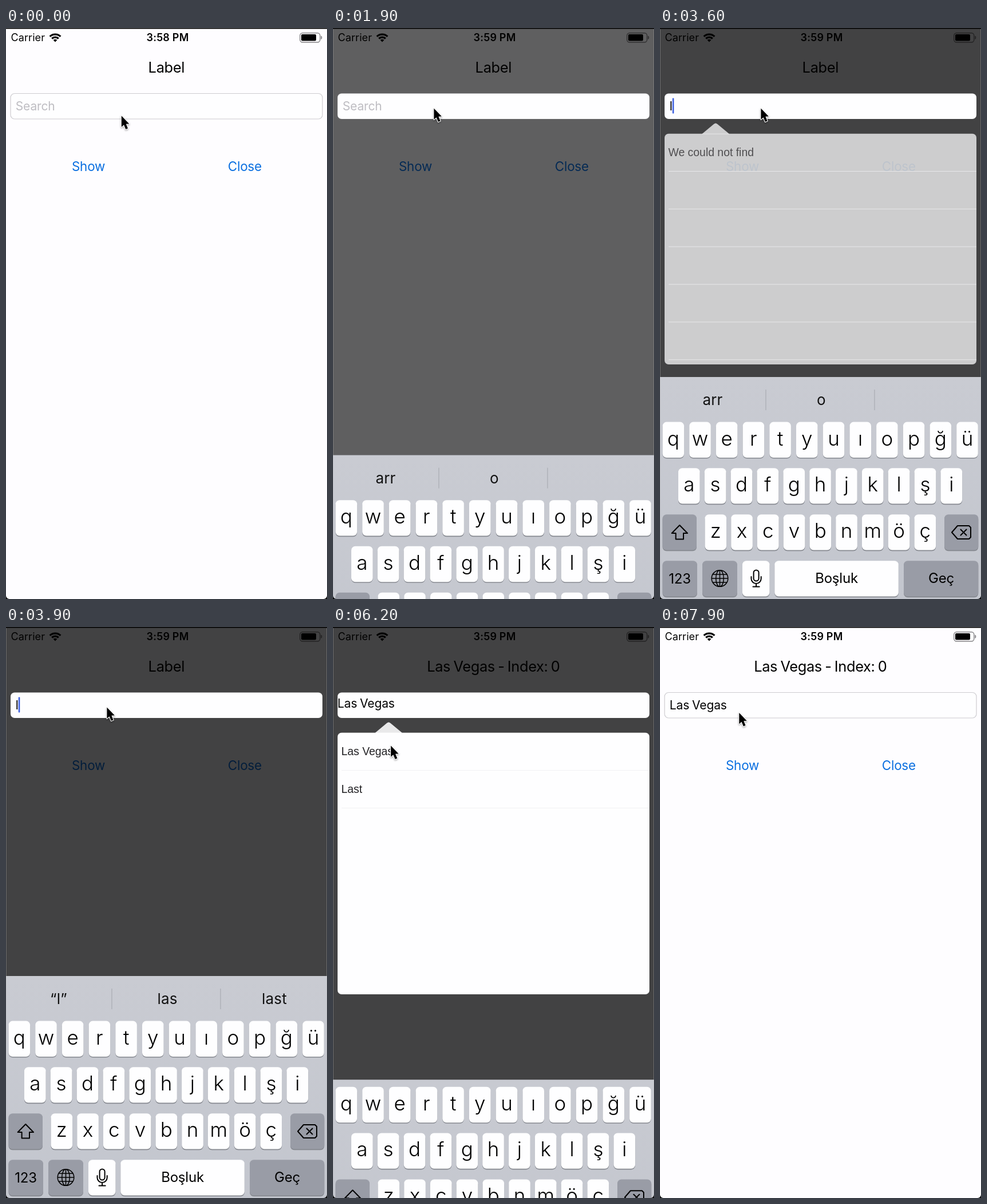
Recreate the animation shown at these times as an HTML page with a canvas. Size 561 by 998 pixels, loop 8 s.

```html
<!DOCTYPE html>
<html lang="en">
<head>
<meta charset="utf-8">
<title>Search field</title>
<style>
  html, body { margin: 0; width: 100%; height: 100%; overflow: hidden; background: #fefdff; }
  canvas { display: block; }
</style>
</head>
<body>
<canvas id="stage" width="561" height="998"></canvas>
<script>
const W = 561, H = 998, LOOP = 8000, STEP = 100;
const ctx = document.getElementById('stage').getContext('2d');
const UI = 'Inter, Roboto, sans-serif';
const LIST = '"Liberation Sans", Arial, sans-serif';
const PAPER = '#fefdff';

const lerp = (a, b, p) => a + (b - a) * p;
const ramp = (t, from, to) => Math.min(1, Math.max(0, (t - from) / (to - from)));
const ease = u => u * u * (3 - 2 * u);
const fade = (t, from, to) => ease(ramp(t, from, to));

function setFont(size, { weight = 400, family = UI, gap = 0, word = 0 } = {}) {
  ctx.font = `${weight} ${size}px ${family}`;
  ctx.letterSpacing = gap + 'px';
  ctx.wordSpacing = word + 'px';
}

function text(str, x, y, size, { color = '#000', align = 'left', ...font } = {}) {
  setFont(size, font);
  ctx.textAlign = align;
  ctx.fillStyle = color;
  ctx.fillText(str, x, y);
}

function box(x, y, w, h, r, color) {
  ctx.beginPath();
  ctx.roundRect(x, y, w, h, r);
  ctx.fillStyle = color;
  ctx.fill();
}

function path(points, closed = true) {
  ctx.beginPath();
  points.forEach(([x, y]) => ctx.lineTo(x, y));
  if (closed) ctx.closePath();
}

function withAlpha(alpha, draw) {
  if (alpha <= 0) return;
  ctx.save();
  ctx.globalAlpha *= alpha;
  draw();
  ctx.restore();
}

function drawStatus(t) {
  text('Carrier', 8.5, 23.3, 18, { gap: 0.1 });
  text(t < 1300 ? '3:58 PM' : '3:59 PM', 282.5, 23.3, 18, { weight: 600, align: 'center', gap: 0.2 });

  const up = -Math.PI / 2;
  ctx.strokeStyle = ctx.fillStyle = '#000';
  ctx.lineWidth = 3.3;
  for (const r of [8.3, 13.4]) {
    ctx.beginPath();
    ctx.arc(86, 24.5, r, up - 0.77, up + 0.77);
    ctx.stroke();
  }
  ctx.beginPath();
  ctx.moveTo(86, 24.5);
  ctx.arc(86, 24.5, 4.8, up - 0.77, up + 0.77);
  ctx.fill();

  ctx.strokeStyle = '#858487';
  ctx.lineWidth = 1.4;
  ctx.beginPath();
  ctx.roundRect(513.8, 8.7, 35, 16.3, 4.5);
  ctx.stroke();
  box(516, 11, 26, 11.6, 2, '#000');
  box(550.3, 13.8, 2, 6, [0, 2, 2, 0], '#858487');
}

function drawPage(t) {
  ctx.fillStyle = PAPER;
  ctx.fillRect(0, 0, W, H);
  drawStatus(t);
  text(t < 6100 ? 'Label' : 'Las Vegas - Index: 0', 280.3, 78, 25.4,
    { align: 'center', gap: -0.35, word: -1.5 });
  for (const [name, x] of [['Show', 144], ['Close', 417.3]]) {
    text(name, x, 250.2, 22.4, { color: '#0a6fe0', align: 'center', gap: -0.2 });
  }
}

function typed(t) {
  if (t >= 6100) return 'Las Vegas';
  return t < 3600 ? '' : t < 4100 ? 'l' : t < 4500 ? 'la' : 'las';
}

function caretOn(t) {
  if (t < 2100 || t >= 6100) return false;
  if (t < 3600) return (t + 200) % 1000 < 500;
  return t < 4500 || (t - 4500) % 1000 < 500;
}

function drawField(t, dim) {
  box(8, 114.5, 545, 44.5, 7, '#fefeff');
  withAlpha(1 - dim, () => {
    ctx.strokeStyle = '#cdccd0';
    ctx.lineWidth = 1.2;
    ctx.stroke();
  });
  const shift = t < 6100 ? 0 : 1 - fade(t, 6250, 6500);
  const x = 16.8 - 9 * shift, y = 143.8 - 2.6 * shift;
  const value = typed(t);
  const style = { gap: -0.15, word: -0.8 };
  text(value || 'Search', x, y, 21, { ...style, color: value ? '#000' : '#bebdc2' });
  if (caretOn(t)) {
    setFont(21, style);
    box(x + ctx.measureText(value).width, 122.5, 2.6, 27, 1, '#3c5fdf');
  }
}

function drawPopup(t, bottom) {
  const leaving = t >= 6100;
  withAlpha(leaving ? 0.89 : 1, () => {
    ctx.beginPath();
    ctx.moveTo(73, 185.5);
    ctx.lineTo(94, 168);
    ctx.quadraticCurveTo(97.2, 164.8, 100.4, 168);
    ctx.lineTo(121.5, 185.5);
    ctx.fillStyle = '#fefeff';
    ctx.fill();
  });
  box(8, 184.8, 545, bottom - 184.8, 7, '#fefeff');
  ctx.fillStyle = '#f1f1f3';
  for (let i = 0; i < (leaving ? 2 : 6); i++) ctx.fillRect(15, 250 + i * 65.85, 538, 1);
  const rows = t < 3900 ? ['We could not find'] : ['Las Vegas', 'Last'];
  rows.forEach((row, i) =>
    text(row, 14.5, 224.4 + i * 65.85, 19.4, { family: LIST, color: '#232225' }));
}

const HINTS = [
  [0, ['arr', 'o', '']],
  [3600, ['“l”', 'las', 'last']],
  [4100, ['“la”', 'las', 'last']],
  [4500, ['“las”', 'last', 'lasti']],
];

// The shared start of both words stays solid while the endings cross-fade.
function morph(from, to, cx, y, p) {
  let n = 0;
  while (n < from.length && from[n] === to[n]) n++;
  const font = { gap: 0.2, color: '#111' };
  setFont(26, font);
  const wide = s => ctx.measureText(s).width;
  const x = cx - lerp(wide(from), wide(to), p) / 2;
  const head = to.slice(0, n), tail = x + wide(head);
  text(head, x, y, 26, font);
  withAlpha(1 - p, () => text(from.slice(n), tail, y, 26, font));
  withAlpha(p, () => text(to.slice(n), tail, y, 26, font));
}

function drawHints(t) {
  const now = HINTS.findLastIndex(([at]) => t >= at);
  const [at, words] = HINTS[now];
  const before = HINTS[Math.max(0, now - 1)][1];
  const p = ramp(t, at, at + 300);
  [92, 282, 469].forEach((cx, i) => morph(before[i], words[i], cx, 659, now ? p : 1));
  ctx.fillStyle = '#abaeb5';
  ctx.fillRect(184.3, 632, 1.3, 36);
  ctx.fillRect(374.3, 632, 1.3, 36);
}

function key(x, y, w, dark) {
  box(x, y + 1.6, w, 62.4, 7, '#868990');
  box(x, y, w, 62.4, 7, dark ? '#999ca6' : '#fefeff');
}

const KEY_ROWS = [
  ['qwertyuıopğü', 4.5, 688.6, 46.7],
  ['asdfghjklşi', 32, 769.2, 45.85],
  ['zxcvbnmöç', 78.5, 850.2, 45.75],
];

function drawIcons() {
  ctx.strokeStyle = ctx.fillStyle = '#000';
  ctx.lineWidth = 2;
  ctx.lineJoin = ctx.lineCap = 'round';
  path([[34.3, 869], [48, 883], [41, 883], [41, 893.5], [27.6, 893.5], [27.6, 883], [20.6, 883]]);
  ctx.stroke();

  path([[510, 881.5], [520, 870], [540, 870], [543, 873], [543, 890], [540, 893], [520, 893]]);
  ctx.stroke();
  path([[525.5, 876.5], [535.5, 886.5]], false);
  ctx.stroke();
  path([[535.5, 876.5], [525.5, 886.5]], false);
  ctx.stroke();

  ctx.lineWidth = 1.5;
  ctx.beginPath();
  ctx.arc(104.5, 962, 14.3, 0, 7);
  ctx.moveTo(111.3, 962);
  ctx.ellipse(104.5, 962, 6.8, 14.3, 0, 0, 7);
  ctx.moveTo(104.5, 947.7);
  ctx.lineTo(104.5, 976.3);
  for (const [dy, half] of [[-7, 12.4], [0, 14.3], [7, 12.4]]) {
    ctx.moveTo(104.5 - half, 962 + dy);
    ctx.lineTo(104.5 + half, 962 + dy);
  }
  ctx.stroke();

  ctx.lineWidth = 2;
  ctx.beginPath();
  ctx.roundRect(163.6, 947.5, 9, 19, 4.5);
  ctx.moveTo(159.5, 959);
  ctx.lineTo(159.5, 962.5);
  ctx.arc(168.1, 962.5, 8.6, Math.PI, 0, true);
  ctx.lineTo(176.7, 959);
  ctx.moveTo(168.1, 971);
  ctx.lineTo(168.1, 976.5);
  ctx.moveTo(162.5, 976.5);
  ctx.lineTo(173.7, 976.5);
  ctx.stroke();
}

function drawKeyboard(t) {
  const leaving = t >= 6100;
  const offset = leaving ? 322 * fade(t, 6000, 6495) : 388 * (1 - fade(t, 1600, 2100));
  const top = leaving ? 676 : 610;
  if (top + offset >= H) return;
  ctx.save();
  ctx.translate(0, offset);
  const shade = ctx.createLinearGradient(0, 610, 0, H);
  shade.addColorStop(0, '#c9cbd2');
  shade.addColorStop(1, '#c3c6ce');
  ctx.fillStyle = shade;
  ctx.fillRect(0, top, W, H - top);
  if (!leaving) drawHints(t);

  for (const [letters, x0, y, pitch] of KEY_ROWS) {
    [...letters].forEach((letter, i) => {
      const x = x0 + i * pitch;
      key(x, y, 37.6);
      text(letter, x + 18.8, y + 41, 35, { weight: 300, align: 'center' });
    });
  }
  key(4.5, 850.2, 59.5, true);
  key(497, 850.2, 59.3, true);
  key(4.5, 931.2, 60.5, true);
  key(74, 931.2, 61, true);
  key(144, 931.2, 47.5);
  key(200.3, 931.2, 216.5);
  key(426, 931.2, 130.3, true);
  const label = { align: 'center', gap: -0.2 };
  text('123', 34.5, 971, 24, label);
  text('Boşluk', 308.5, 970, 24, label);
  text('Geç', 491.5, 970, 24, label);
  drawIcons();
  ctx.restore();
}

function drawEdges(dim) {
  withAlpha(dim * 0.35, () => {
    ctx.fillStyle = '#b5b4b7';
    ctx.fillRect(0, 2, 1, H);
    ctx.fillRect(W - 1, 2, 1, H);
  });
  ctx.fillStyle = '#000';
  ctx.fillRect(0, 0, W, 1.5);
  ctx.beginPath();
  ctx.rect(0, H - 20, W, 20);
  ctx.roundRect(0, H - 40, W, 40, [0, 0, 6, 6]);
  ctx.rect(0, H - 40, W, 20);
  ctx.fill('evenodd');
}

const POINTER = [
  [0, 201, 152], [600, 201, 152], [1000, 182, 150], [1200, 182, 150], [1500, 175.6, 139],
  [5300, 175.6, 139], [5900, 100.3, 206], [6200, 100.3, 206], [6900, 131, 132],
  [7100, 131, 132], [7400, 137, 146], [7800, 137, 146], [7900, 137.5, 148.5],
];

function drawPointer(t) {
  const i = POINTER.findLastIndex(([at]) => t >= at);
  const a = POINTER[i], b = POINTER[i + 1] || a;
  const p = a === b ? 0 : fade(t, a[0], b[0]);
  ctx.save();
  ctx.translate(lerp(a[1], b[1], p), lerp(a[2], b[2], p));
  path([[0.8, 1.5], [0.8, 21], [5, 17.2], [8.3, 25], [12, 23.4], [8.8, 15.8], [14.3, 15.4]]);
  ctx.lineJoin = 'round';
  ctx.lineWidth = 2.2;
  ctx.strokeStyle = '#fff';
  ctx.shadowColor = 'rgba(0,0,0,.35)';
  ctx.shadowBlur = 3;
  ctx.shadowOffsetY = 1.5;
  ctx.stroke();
  ctx.shadowColor = 'transparent';
  ctx.fillStyle = '#000';
  ctx.fill();
  ctx.restore();
}

function draw(t) {
  const dim = fade(t, 1600, 2000) * (1 - fade(t, 6200, 6700));
  const popup = t < 3900
    ? fade(t, 1900, 2300) * (1 - fade(t, 3500, 3800))
    : fade(t, 4000, 4300) * (1 - fade(t, 6200, 6600));
  const bottom = lerp(588, 739, t < 6100 ? 0 : fade(t, 6000, 6495));

  drawPage(t);
  withAlpha(dim * 0.737, () => {
    ctx.fillStyle = '#000';
    ctx.fillRect(0, 0, W, H);
  });
  drawField(t, dim);
  withAlpha(popup, () => drawPopup(t, bottom));
  drawKeyboard(t);
  drawEdges(dim);
  drawPointer(t);
}

const start = performance.now();
function tick() {
  const t = (performance.now() - start) % LOOP;
  draw(Math.floor(t / STEP) * STEP);
  requestAnimationFrame(tick);
}
tick();
</script>
</body>
</html>
```
